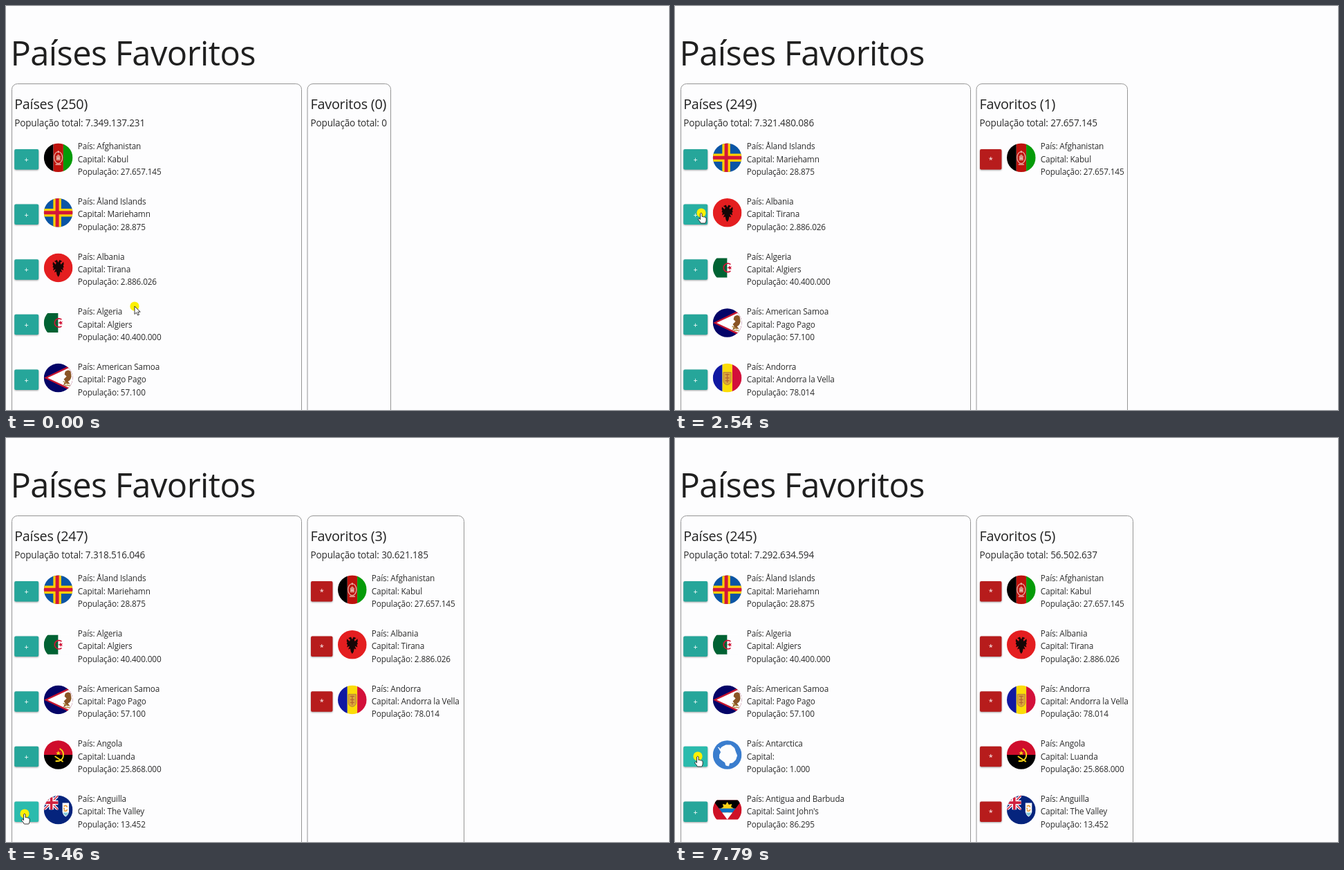
These frames come from a looping animation (959x584 px, 8 s). An HTML page:

```html
<!DOCTYPE html>
<html lang="pt">
<head>
<meta charset="utf-8">
<title>Países Favoritos</title>
<style>
  html, body { margin: 0; width: 100%; height: 100%; overflow: hidden; background: #fdfdfe; }
  svg { display: block; width: 100%; height: 100%; }
  text { font-family: "Open Sans", "Noto Sans", sans-serif; font-size: 11.78px; letter-spacing: -.012em; fill: #2b2b2b; }
  .title { font-size: 48.8px; fill: #1f1f1f; }
  .head { font-size: 19.8px; fill: #222; }
  .total { font-size: 13.55px; }
  .sign { font-size: 11px; fill: #fff; text-anchor: middle; }
  .panel { fill: none; stroke: #959595; }
  .button { filter: drop-shadow(0 1.5px 1.2px rgba(0, 0, 0, .35)); }
</style>
</head>
<body>
<svg viewBox="0 0 959 584">
  <defs>
    <clipPath id="round"><circle r="20.8"/></clipPath>
    <clipPath id="canton"><path d="M-21-21H0V0H-21Z"/></clipPath>
  </defs>
  <text class="title" x="6.4" y="86">Países Favoritos</text>
  <rect class="panel" x="8.5" y="112.5" width="419" height="500" rx="8"/>
  <rect class="panel" id="favPanel" x="436" y="112.5" height="500" rx="8"/>
  <g id="lists"></g>
  <g id="cursor">
    <circle r="6.6" fill="#fcf003"/>
    <path id="arrow" d="M0 0V11.5L2.7 9L4.6 13L6.5 12.2L4.7 8.2H8.2Z" fill="#fff" stroke="#222" stroke-width=".9"/>
    <path id="hand" d="M-1.5 1Q-.2-.8 1 1V5.5Q2.4 4.6 3.3 6Q4.7 5.2 5.4 6.6Q7.2 6.2 7.2 8V11Q7 13 5.8 15H-.6Q-1.8 12.6-4 10.2Q-5 8.6-3.6 8.2Q-2.6 8-1.5 9.6Z" fill="#fff" stroke="#222" stroke-width=".9" stroke-linejoin="round"/>
  </g>
</svg>
<script>
const LOOP = 8000, ROW = 79.6, WORLD = 7349137231;
const $ = id => document.getElementById(id);
const path = (d, fill, more = '') => `<path d="${d}" fill="${fill}" ${more}/>`;
const line = (d, color, width) => path(d, 'none', `stroke="${color}" stroke-width="${width}"`);
const thirds = (a, b, c) =>
  path('M-21-21H-7V21H-21Z', a) + path('M-7-21H7.3V21H-7Z', b) + path('M7.3-21H21V21H7.3Z', c);
const field = color => path('M-21-21H21V21H-21Z', color);

function sunRays(count, inner, outer) {
  return Array.from({ length: count * 2 }, (_, i) => {
    const a = Math.PI * (1 + i / count), r = i % 2 ? inner : outer;
    return `${(r * Math.cos(a)).toFixed(1)},${(r * Math.sin(a) - 2).toFixed(1)}`;
  }).join(' ');
}

const flags = {
  afghanistan: thirds('#000', '#bd120c', '#049b08') +
    `<ellipse rx="6" ry="8.5" fill="none" stroke="#e6aaa0" stroke-width="1.3"/>` +
    path('M-3 4V-2L0-5L3-2V4Z', '#db8f82') + line('M-2 1H2M0-10V-7M-4 10H4', '#f3cfc6', 1.2),
  aland: field('#0a55a5') + line('M-1.5-21V21M-21 0H21', '#ffd000', 11.5) +
    line('M-1.5-21V21M-21 0H21', '#d3163a', 5),
  albania: field('#e41e20') +
    path('M0-8L-2-12L-6-10L-3-8L-4-5L-8-9L-8.5-5L-7.5-4L-8.5-1L-7 0L-8 4L-4 2L-6 7L-3 6L-2 11L0 14L2 11L3 6L6 7L4 2L8 4L7 0L8.5-1L7.5-4L8.5-5L8-9L4-5L3-8L6-10L2-12Z', '#150606', 'transform="scale(.95)"'),
  algeria: path('M-21-14H0V14H-21Z', '#006233') + path('M0-14H21V14H0Z', '#fdfdfe') +
    line('M4.8-4.8A6.2 6.2 0 1 0 4.8 4.8', '#d21034', 1.7) +
    path('M-.5 0L2.3-.9V-3.5L4-1.3L6.5-2L5 0L6.5 2L4 1.3V3.5L2.3 .9Z', '#d21034'),
  samoa: field('#040468') + path('M-20.5 0L21-20V20Z', '#c5142f') +
    path('M-15.5 0L21-17V17Z', '#fff') +
    path('M10-9Q15-13 18-9L19-2Q18 4 14 5L17 9L12 8L7 11L10 5L8 2L12-2L9-5Z', '#8a5525') +
    line('M7 5L14 9M9 11L17 11', '#b89248', 1.5),
  andorra: thirds('#1018a2', '#fbdc08', '#d3103a') +
    path('M-5.5-8H5.5V5Q5 9 0 10Q-5 9-5.5 5Z', '#dba63a', 'stroke="#b88332"') +
    line('M-3-5H3M-3 0H3M0-6V7M-3 4H3', '#b5642f', 1.3),
  angola: path('M-21-21H21V0H-21Z', '#cf0d2c') + path('M-21 0H21V21H-21Z', '#000') +
    line('M2-9Q9-5 7 3Q5 10-4 9', '#f8d313', 2) + line('M-5 2L7 10', '#f8d313', 2) +
    path('M0-6L1-3.5H3.5L1.5-2L2.3 .5L0-1L-2.3 .5L-1.5-2L-3.5-3.5H-1Z', '#f8d313'),
  anguilla: field('#05247d') + `<g clip-path="url(#canton)">` +
    line('M-21-21L0 0M0-21L-21 0', '#fff', 4) + line('M-21-21L0 0M0-21L-21 0', '#d0213e', 1.4) +
    line('M-10-21V0M-21-10.5H0', '#fff', 6.5) + line('M-10-21V0M-21-10.5H0', '#d0213e', 3.6) + '</g>' +
    path('M6-10H15.5V3Q14 8 10.7 10Q7 8 6 3Z', '#fff') +
    path('M7 4H14.5Q13 8 10.7 9Q8 7 7 4Z', '#7fc8dc') +
    line('M8-5Q11-8 13-4M13-1Q12 3 8 1M8-3L9 0', '#ef9b32', 1.7),
  antarctica: field('#3a7dce') +
    path('M-13-11L-10-8L-8-11L-2-14L5-14L10-10L12-4L14 1L12 7L8 11L3 12L2 16L-2 15L-3 11L-6 9L-11 5L-11 0L-9-4Z', '#fdfdfe', 'stroke="#fdfdfe" stroke-linejoin="round"'),
  antigua: path('M-21-14H21V14H-21Z', '#ce1126') + path('M-21-14H21L12-2H-12Z', '#000') +
    `<polygon points="${sunRays(8, 6, 9.5)}" fill="#fcd116"/>` +
    path('M-12-2H12L7.5 4H-7.5Z', '#0872c6') + path('M-7.5 4H7.5L0 14Z', '#fff')
};

const countries = [
  ['Afghanistan', 'Kabul', 27657145, 'afghanistan'],
  ['Åland Islands', 'Mariehamn', 28875, 'aland'],
  ['Albania', 'Tirana', 2886026, 'albania'],
  ['Algeria', 'Algiers', 40400000, 'algeria'],
  ['American Samoa', 'Pago Pago', 57100, 'samoa'],
  ['Andorra', 'Andorra la Vella', 78014, 'andorra'],
  ['Angola', 'Luanda', 25868000, 'angola'],
  ['Anguilla', 'The Valley', 13452, 'anguilla'],
  ['Antarctica', '', 1000, 'antarctica'],
  ['Antigua and Barbuda', "Saint John's", 86295, 'antigua']
];

// [click time, country index]
const clicks = [[1920, 0], [3250, 2], [4710, 5], [5540, 7], [7290, 6]];
const panelRight = [556.5, 654.5, 654.5, 662.5, 662.5, 662.5];

// [time, x, y] of the pointer
const stops = [
  [0, 186, 434], [130, 186, 434], [1010, 27, 232], [2220, 27, 232], [2540, 38, 299],
  [3080, 36, 298], [3520, 36, 298], [4080, 41, 467], [4850, 41, 467], [5460, 27, 543],
  [6330, 27, 543], [7100, 33, 460], [LOOP, 33, 460]
];

const dots = n => String(n).replace(/\B(?=(\d{3})+$)/g, '.');
const label = (x, y, text, kind = '') => `<text class="${kind}" x="${x}" y="${y}">${text}</text>`;

function row([name, capital, people, flag], i, x, fav) {
  const width = fav ? 31.5 : 35, textX = fav ? 528.8 : 103.8, flagX = fav ? 500.8 : 75.6;
  return `<g transform="translate(0 ${i * ROW})">
    <rect class="button" x="${x}" y="207" width="${width}" height="29.5" rx="2" fill="${fav ? '#b71c1c' : '#26a69a'}"/>
    ${label(x + width / 2, 226.3, fav ? '*' : '+', 'sign')}
    <g transform="translate(${flagX} 219.2)"><g clip-path="url(#round)">${flags[flag]}</g></g>
    ${label(textX, 207.4, 'País: ' + name)}
    ${label(textX, 225.8, 'Capital: ' + capital)}
    ${label(textX, 244.2, 'População: ' + dots(people))}
  </g>`;
}

function list(title, count, total, items, x, fav) {
  return label(x, 149, `${title} (${count})`, 'head') +
    label(x, 174, 'População total: ' + dots(total), 'total') +
    `<g>${items.slice(0, 5).map((c, i) => row(c, i, x + (fav ? .5 : 0), fav)).join('')}</g>`;
}

let shown = -1, buttons = [];
function showLists(count) {
  if (count === shown) return;
  shown = count;
  const picked = clicks.slice(0, count).map(c => c[1]);
  const favs = countries.filter((_, i) => picked.includes(i));
  const rest = countries.filter((_, i) => !picked.includes(i));
  const sum = favs.reduce((s, c) => s + c[2], 0);
  $('lists').innerHTML = list('Países', 250 - count, WORLD - sum, rest, 12.2, false) +
    list('Favoritos', count, sum, favs, 440.5, true);
  $('favPanel').setAttribute('width', panelRight[count] - 436);
  buttons = [...document.querySelectorAll('.button')].slice(0, 5);
}

function pointer(t) {
  const i = Math.max(1, stops.findIndex(s => s[0] >= t));
  const [t0, x0, y0] = stops[i - 1], [t1, x1, y1] = stops[i];
  const u = Math.max(0, (t - t0) / (t1 - t0)), e = u * u * (3 - 2 * u);
  return [x0 + (x1 - x0) * e, y0 + (y1 - y0) * e];
}

function hovered(t) {
  const [x, y] = pointer(Math.max(0, t)), i = Math.floor((y - 207) / ROW);
  return x >= 12 && x <= 47 && y - 207 - i * ROW <= 29.5 ? i : -1;
}

function draw(t) {
  showLists(clicks.filter(c => c[0] <= t).length);
  // A 200 ms fade, taken as the share of recent time spent over each button
  const glow = [0, 0, 0, 0, 0];
  for (let k = 0; k < 20; k++) {
    const i = hovered(t - k * 10);
    if (i >= 0) glow[i] += 1 / 20;
  }
  buttons.forEach((b, i) => {
    const g = glow[i];
    b.setAttribute('fill', `rgb(${38 + 5 * g}, ${166 + 21 * g}, ${154 + 19 * g})`);
  });
  const [x, y] = pointer(t), over = hovered(t) >= 0;
  $('cursor').setAttribute('transform', `translate(${x} ${y})`);
  $('hand').style.display = over ? '' : 'none';
  $('arrow').style.display = over ? 'none' : '';
}

const start = performance.now();
function tick() {
  draw((performance.now() - start) % LOOP);
  requestAnimationFrame(tick);
}
tick();
</script>
</body>
</html>
```
